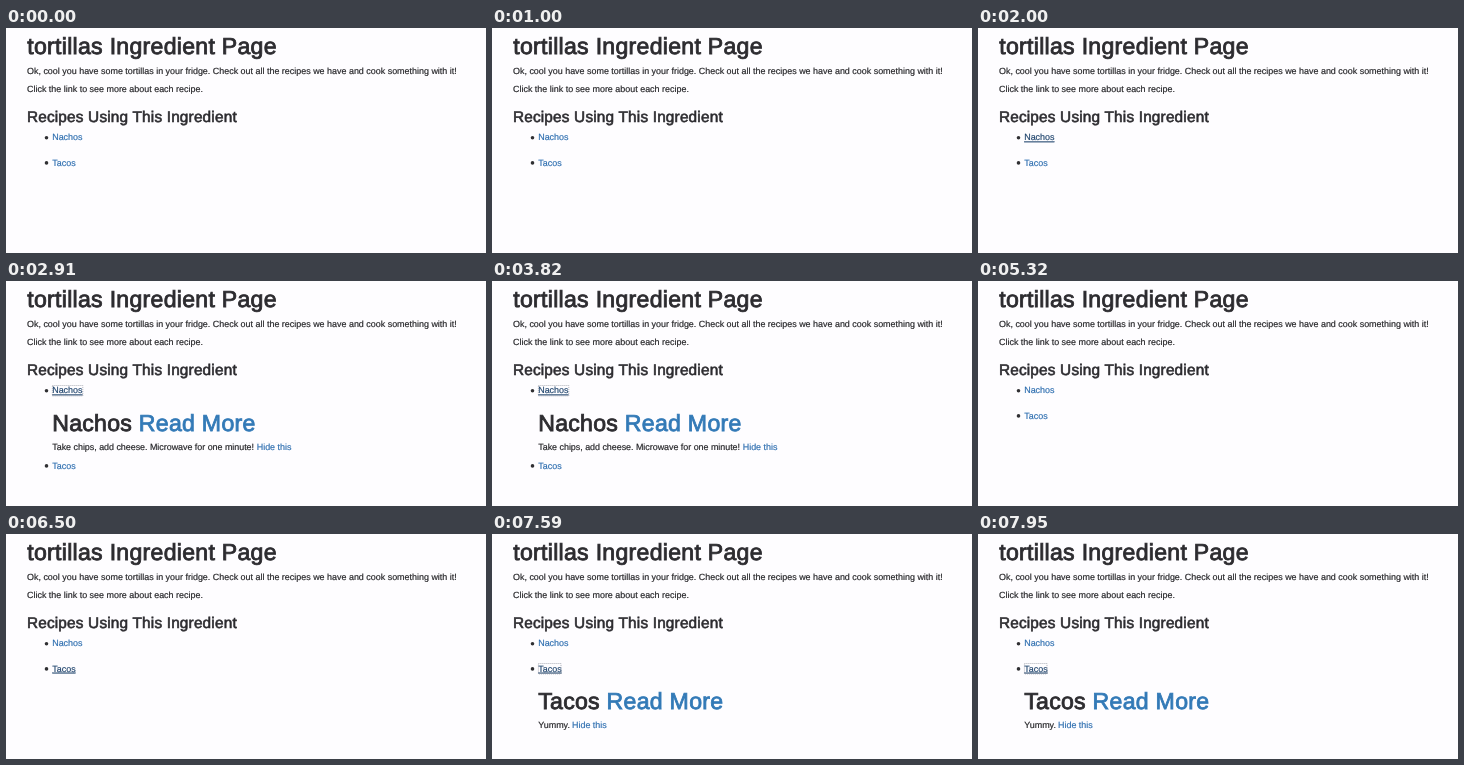
An HTML page that plays this animation: 480 by 225 pixels, repeating every 8000 ms.

```html
<!DOCTYPE html>
<html lang="en">
<head>
<meta charset="utf-8">
<title>Ingredient Page</title>
<style>
  html, body { margin: 0; width: 100%; height: 100%; overflow: hidden; background: #fefdff; }
  svg { display: block; width: 480px; height: 225px; }
  text {
    font: 8.95px "Liberation Sans", Arial, sans-serif;
    fill: #252528;
    stroke: #252528;
    stroke-width: .18px;
    text-rendering: geometricPrecision;
    white-space: pre;
  }
  .h1, .h2 { letter-spacing: .012em; fill: #2d2c30; stroke: #2d2c30; }
  .h1 { font-size: 23.1px; stroke-width: .85px; }
  .h2 { font-size: 15.36px; stroke-width: .6px; }
  .snug { letter-spacing: -.03px; }
  .link { fill: #2f6fb0; stroke: #2f6fb0; }
  .h1 .link { fill: #337ab7; stroke: #337ab7; }
  .bullet { fill: #303033; }
  .focus { fill: none; stroke: #8a8f9a; stroke-width: .7; stroke-dasharray: 1 1; }

  /* Every state is a hard switch within one 8 s loop. */
  .nachos-link, .hide-link, .tacos-link, .nachos-open, .tacos-open, .tacos-row {
    animation: 8s step-end infinite;
  }
  .nachos-link { animation-name: nachos-hover; }
  .hide-link { animation-name: hide-hover; }
  .tacos-link { animation-name: tacos-hover; }
  .nachos-open { animation-name: nachos-open; }
  .tacos-open { animation-name: tacos-open; }
  .tacos-row { animation-name: push-down; }

  @keyframes nachos-hover {
    0%, 61% { fill: #2f6fb0; stroke: #2f6fb0; text-decoration: none; }
    21.875% { fill: #23476f; stroke: #23476f; text-decoration: underline .7px; }
  }
  @keyframes hide-hover {
    0%, 61% { fill: #2f6fb0; stroke: #2f6fb0; text-decoration: none; }
    53.125% { fill: #23476f; stroke: #23476f; text-decoration: underline .7px; }
  }
  @keyframes tacos-hover {
    0% { fill: #2f6fb0; stroke: #2f6fb0; text-decoration: none; }
    76.25%, 100% { fill: #23476f; stroke: #23476f; text-decoration: underline .7px; }
  }
  @keyframes nachos-open {
    0%, 61% { visibility: hidden; }
    28.125% { visibility: visible; }
  }
  @keyframes tacos-open {
    0% { visibility: hidden; }
    88.125%, 100% { visibility: visible; }
  }
  @keyframes push-down {
    0%, 61% { transform: none; }
    28.125% { transform: translateY(50px); }
  }
</style>
</head>
<body>
<svg viewBox="0 0 480 225">
  <text class="h1" x="21.3" y="26.2">tortillas Ingredient Page</text>
  <text x="21" y="45.6">Ok, cool you have some tortillas in your fridge. Check out all the recipes we have and cook something with it!</text>
  <text x="21" y="64">Click the link to see more about each recipe.</text>
  <text class="h2" x="20.9" y="94">Recipes Using This Ingredient</text>

  <circle class="bullet" cx="40.5" cy="109.8" r="1.8"/>
  <text class="link nachos-link" x="46.2" y="112.4">Nachos</text>
  <g class="nachos-open">
    <rect class="focus" x="46.4" y="104.5" width="30.4" height="10.4"/>
    <text class="h1" x="46.2" y="149.5">Nachos <tspan class="link">Read More</tspan></text>
    <text class="snug" x="46.3" y="168.7">Take chips, add cheese. Microwave for one minute!</text>
    <text class="link hide-link" x="250.7" y="168.7">Hide this</text>
  </g>

  <g class="tacos-row">
    <circle class="bullet" cx="40.5" cy="134.9" r="1.8"/>
    <text class="link tacos-link" x="46.3" y="137.6">Tacos</text>
  </g>
  <g class="tacos-open">
    <rect class="focus" x="46.4" y="129.5" width="22.6" height="10.4"/>
    <text class="h1" x="46.2" y="174.7">Tacos <tspan class="link">Read More</tspan></text>
    <text x="46.3" y="193.7">Yummy.</text>
    <text class="link" x="80" y="193.7">Hide this</text>
  </g>
</svg>
</body>
</html>
```
